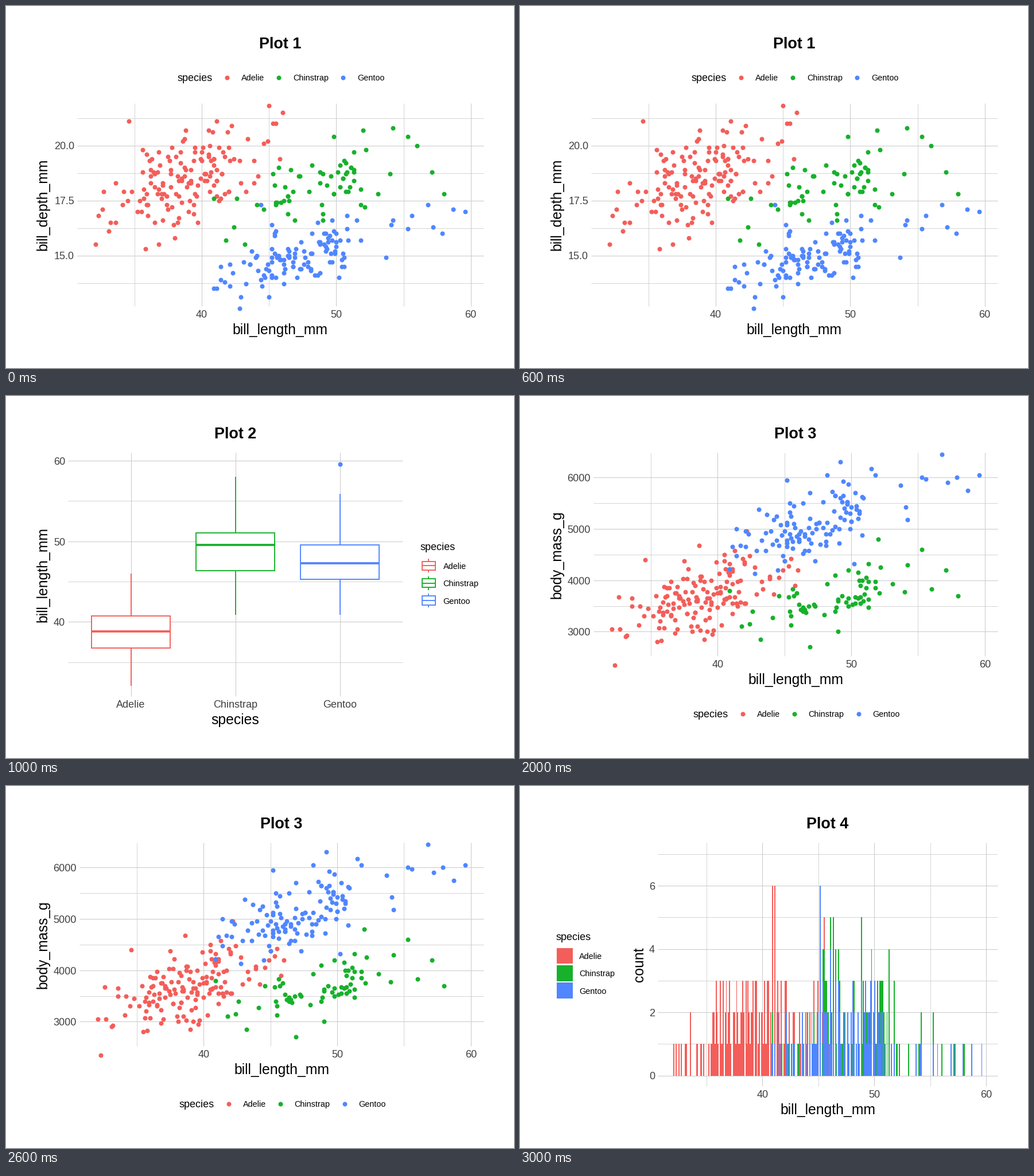
A matplotlib script for the animation above (4 s loop, 885 by 632 pixels).

```python
import matplotlib.pyplot as plt
import numpy as np
from matplotlib.animation import FuncAnimation
from matplotlib.patches import Rectangle

W, H, DPI = 885, 632, 64
PT = 72 / DPI  # points per pixel
RED, GREEN, BLUE = "#f35e5a", "#17b12b", "#5086ff"
GRID, TICK = "#cbcbcb", "#3f3f3f"
SPECIES = {"Adelie": RED, "Chinstrap": GREEN, "Gentoo": BLUE}
LAYERS = ("Adelie", "Gentoo", "Chinstrap")
plt.rcParams["font.family"] = "Liberation Sans"


def sample(seed, n, deciles, mode, depth, mass, notable):
    """Draw n birds as rows of bill length, bill depth and body mass.

    Lengths follow `deciles` and gather at `mode`. `depth` holds level, slope
    and spread about the median length; `mass` also has a gain on the depth
    residual. Each `notable` bird replaces the one nearest in length.
    """
    rng = np.random.default_rng(seed)
    u = np.linspace(0, 1, n)
    u += rng.uniform(-2, 2, n) / n * np.sqrt(np.abs(np.sin(np.pi * u)))
    length = np.interp(u, np.linspace(0, 1, len(deciles)), deciles).round(1)
    length[np.abs(length - mode) < 0.15] = mode

    offset = length - deciles[len(deciles) // 2]
    noise = np.clip(rng.normal(size=(2, n)), -2.2, 2.2)
    level, slope, spread = depth
    residual = spread * noise[0]
    deep = (level + slope * offset + residual).round(1)
    level, slope, gain, spread = mass
    heavy = level + slope * offset + gain * residual + spread * noise[1]

    birds = np.column_stack([length, deep, np.rint(heavy / 25) * 25])
    for bird in notable:
        birds[np.abs(length - bird[0]).argmin()] = bird
    return birds


BIRDS = {
    "Adelie": sample(
        4, 151,
        (32.1, 35.5, 36.3, 37.2, 38.1, 38.8, 39.6, 40.5, 41.1, 42.2, 46.0), 41.1,
        (18.3, 0.18, 1.1), (3690, 90, 160, 320),
        [(32.1, 15.5, 3050), (33.1, 16.1, 2900), (34.6, 21.1, 4400),
         (46.0, 21.5, 4200)]),
    "Chinstrap": sample(
        7, 68,
        (40.9, 45.2, 46.0, 46.6, 48.5, 49.6, 50.4, 50.8, 51.4, 52.2, 58.0), 51.3,
        (18.5, 0.21, 0.85), (3760, 58, 170, 270),
        [(46.9, 16.6, 2700), (52.0, 20.7, 4800), (54.2, 20.8, 4300),
         (58.0, 17.8, 3700)]),
    "Gentoo": sample(
        11, 123,
        (40.9, 43.6, 45.0, 45.5, 46.3, 47.3, 48.4, 49.3, 49.9, 50.9, 59.6), 45.2,
        (14.95, 0.2, 0.7), (5050, 105, 230, 310),
        [(44.4, 17.3, 5250), (45.2, 16.4, 5950), (49.2, 15.2, 6300),
         (59.6, 17.0, 6050)]),
}

# Lower whisker, quartiles, upper whisker
BOXES = {
    "Adelie": (32.1, 36.75, 38.8, 40.75, 46.0),
    "Chinstrap": (40.9, 46.35, 49.55, 51.08, 58.0),
    "Gentoo": (40.9, 45.3, 47.3, 49.55, 55.9),
}

fig = plt.figure(figsize=(W / DPI, H / DPI), dpi=DPI, facecolor="white")
ax = fig.add_axes([0, 0, 1, 1])


def scale(value, pixel, step):
    """Map data to pixels, with `value` at `pixel` and `step` pixels per unit."""
    return lambda v: pixel + (np.asarray(v) - value) * step


def text(x, y, s, size, ha="left", color="black", **style):
    """Write `s` with the middle of its capitals at height y."""
    ax.text(x, y + 0.36 * size, s, size=size * PT, ha=ha, va="baseline",
            color=color, **style)


def line(x0, y0, x1, y1, color, width, zorder=2):
    ax.plot([x0, x1], [y0, y1], color=color, lw=width * PT,
            solid_capstyle="butt", zorder=zorder)


def dots(x, y, color):
    ax.scatter(x, y, s=(8 * PT) ** 2, color=color, linewidths=0, zorder=3)


def titles(title, xlabel, ylabel, xmid, ymid, xlabel_y=564, ylabel_x=62):
    text(xmid, 64, title, 27, "center", weight="bold")
    text(xmid, xlabel_y, xlabel, 24.8, "center")
    ax.text(ylabel_x + 9, ymid, ylabel, size=24.8 * PT, ha="center",
            va="baseline", rotation=90, rotation_mode="anchor")


def grid(box, xs, ys, xminor=(), yminor=()):
    left, right, top, bottom = box
    for ticks, width in ((yminor, 0.8), (ys, 1.07)):
        for y in ticks:
            line(left, y, right, y, GRID, width)
    for ticks, width in ((xminor, 0.8), (xs, 1.07)):
        for x in ticks:
            line(x, top, x, bottom, GRID, width)


def tick_labels(box, xs, xlabels, ys, ylabels):
    left, _, _, bottom = box
    for x, s in zip(xs, xlabels):
        text(x, bottom + 13.5, s, 18, "center", TICK)
    for y, s in zip(ys, ylabels):
        text(left - 5, y + 0.5, s, 18, "right", TICK)


def panel(box, fx, fy, xticks, yticks, xminor, yminor, yformat="{:g}"):
    xs, ys = fx(xticks), fy(yticks)
    grid(box, xs, ys, fx(xminor), fy(yminor))
    tick_labels(box, xs, map(str, xticks), ys, map(yformat.format, yticks))


def row_legend(left, y):
    text(left, y, "species", 18)
    for offset, (name, color) in zip((86.5, 176.5, 288.5), SPECIES.items()):
        dots(left + offset, y - 0.5, color)
        text(left + offset + 25, y, name, 14.4)


def column_legend(left, draw_key):
    text(left, 262.5, "species", 18)
    for i, (name, color) in enumerate(SPECIES.items()):
        y = 296.3 + 30.3 * i
        draw_key(left + 15.2, y, color)
        text(left + 40.5, y + 0.5, name, 14.4)


def scatter(column, fx, fy):
    for name in LAYERS:
        dots(fx(BIRDS[name][:, 0]), fy(BIRDS[name][:, column]), SPECIES[name])


def box_glyph(x, half, ys, color, median_width):
    low, q1, median, q3, high = ys
    line(x, low, x, q1, color, 1.9)
    line(x, q3, x, high, color, 1.9)
    ax.add_patch(Rectangle((x - half, q3), 2 * half, q1 - q3, fc="white",
                           ec=color, lw=1.9 * PT, zorder=3))
    line(x - half, median, x + half, median, color, median_width, zorder=4)


def depth_plot():
    box = (124, 832, 170, 524)
    fx, fy = scale(40, 341, 23.435), scale(20, 243.5, -38.4)
    panel(box, fx, fy, (40, 50, 60), (20, 17.5, 15), (35, 45, 55),
          (21.25, 18.75, 16.25, 13.75), "{:.1f}")
    titles("Plot 1", "bill_length_mm", "bill_depth_mm", 477.5, 347)
    row_legend(298.5, 125)
    scatter(1, fx, fy)


def box_plot():
    box = (108, 691, 99, 524)
    centres = (217.5, 399.5, 581.5)
    fy = scale(60, 113, -14.07)
    ys = fy((60, 50, 40))
    grid(box, centres, ys, yminor=fy((55, 45, 35)))
    tick_labels(box, centres, SPECIES, ys, ("60", "50", "40"))
    titles("Plot 2", "species", "bill_length_mm", 399.5, 312)
    for x, (name, stats) in zip(centres, BOXES.items()):
        box_glyph(x, 68.3, fy(stats), SPECIES[name], 3.8)
    dots(centres[2], fy(59.6), BLUE)

    def key(x, y, color):
        ys = (y + 12, y + 7.6, y, y - 7.6, y - 12)
        box_glyph(x, 11.4, ys, color, 1.9)

    column_legend(721, key)


def mass_plot():
    box = (128, 832, 99, 454)
    fx, fy = scale(40, 344.2, 23.28), scale(6000, 142.3, -0.0897)
    panel(box, fx, fy, (40, 50, 60), (6000, 5000, 4000, 3000), (35, 45, 55),
          (5500, 4500, 3500))
    titles("Plot 3", "bill_length_mm", "body_mass_g", 480, 277, xlabel_y=494)
    row_legend(301, 555)
    scatter(2, fx, fy)


def count_plot():
    box = (240, 832, 99, 524)
    fx, fy = scale(40, 422.2, 19.51), scale(0, 505.5, -55.25)
    panel(box, fx, fy, (40, 50, 60), (0, 2, 4, 6), (35, 45, 55), (1, 3, 5, 7))
    titles("Plot 4", "bill_length_mm", "count", 536, 312, ylabel_x=206)

    bins = 300
    width = (59.6 - 32.1) / (bins - 1)
    edges = 32.1 + width * (np.arange(bins + 1) - 0.5)
    base = np.zeros(bins)
    for name in ("Gentoo", "Chinstrap", "Adelie"):
        counts, _ = np.histogram(BIRDS[name][:, 0], edges)
        used = counts > 0
        top = base + counts
        ax.bar(fx(edges[:-1][used]), fy(top[used]) - fy(base[used]),
               width * 19.51, bottom=fy(base[used]), align="edge",
               color=SPECIES[name], linewidth=0, zorder=3)
        base = top

    def key(x, y, color):
        ax.add_patch(Rectangle((x - 13.7, y - 13.7), 27.6, 27.6, fc=color, lw=0))

    column_legend(62.5, key)


PLOTS = (depth_plot, box_plot, mass_plot, count_plot)


def update(i):
    ax.clear()
    PLOTS[i % len(PLOTS)]()
    ax.set(xlim=(0, W), ylim=(H, 0))
    ax.axis("off")
    return []


anim = FuncAnimation(fig, update, frames=len(PLOTS), interval=1000,
                     init_func=lambda: update(0), repeat=True, repeat_delay=0)
plt.show()
```
